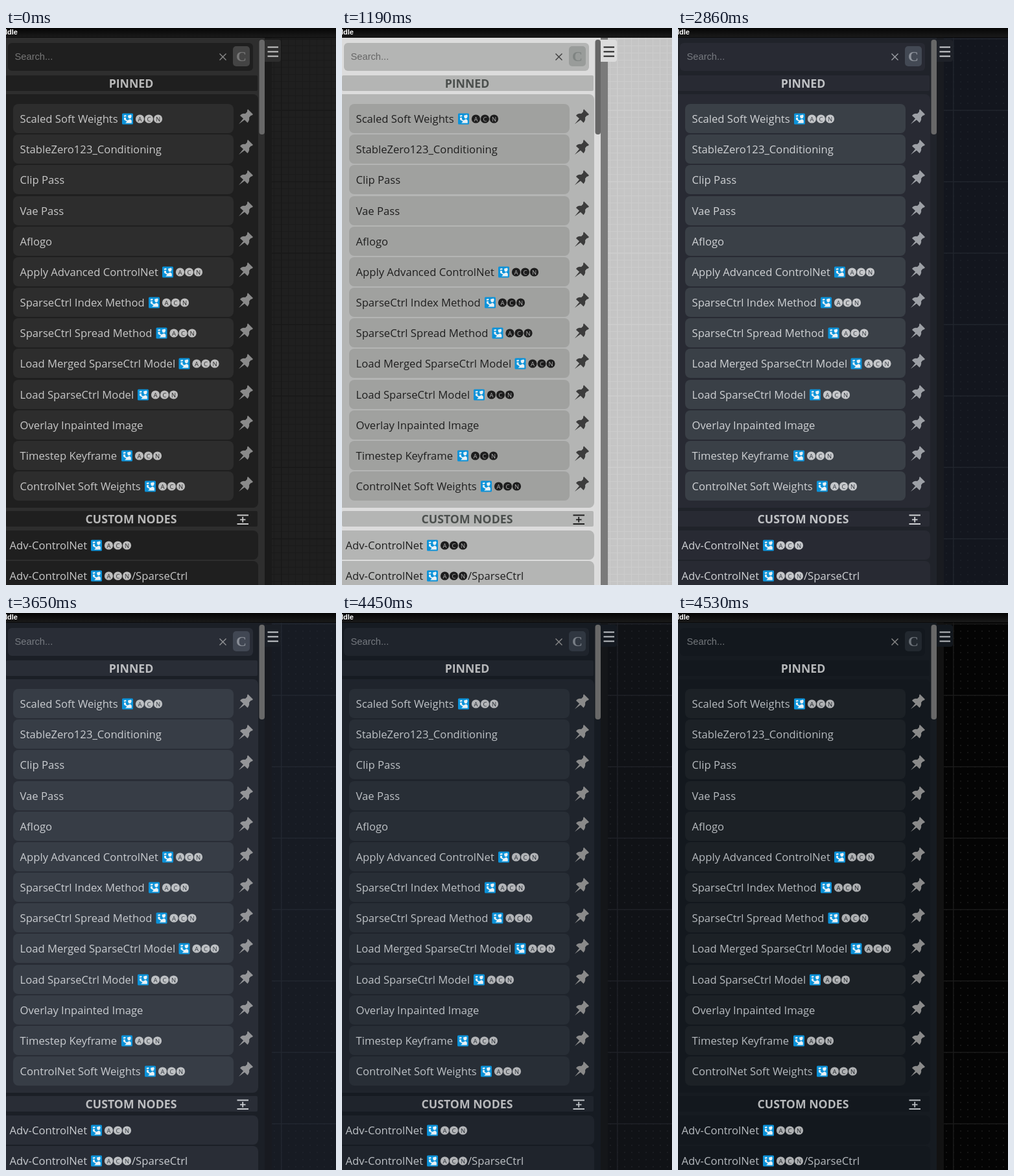
Animation of 509 by 858 pixels, one loop 5.46 s. Source, as an HTML page:

```html
<!DOCTYPE html>
<html lang="en">
<head>
<meta charset="utf-8">
<title>Sidebar themes</title>
<style>
html, body { margin: 0; width: 100%; height: 100%; overflow: hidden; background: #000; }
svg { display: block; width: 509px; height: 858px; }
text { font-family: "Open Sans", "Noto Sans", sans-serif; font-size: 16.65px; fill: var(--text); }
.head { font-size: 17.7px; font-weight: 700; text-anchor: middle; fill: var(--head); }
.status { font: bold 11px "Liberation Sans", Arial, sans-serif; fill: #fff; }
.hint { font: 14.7px "Liberation Sans", Arial, sans-serif; fill: var(--hint); }
.clear { font: bold 22px "Liberation Serif", Times, serif; text-anchor: middle; fill: var(--mark); }
.letter { font: 9.5px "Open Sans", sans-serif; text-anchor: middle; fill: var(--ink); }
.panel { fill: var(--panel); }
.box { fill: var(--box); }
.item { fill: var(--item); }
.pin { fill: var(--pin); }
.disc { fill: var(--disc); }
.stroke { fill: none; stroke: var(--text); stroke-width: 1.8; }
</style>
</head>
<body>
<svg id="stage" viewBox="0 0 509 858">
  <defs>
    <linearGradient id="bar" x2="0" y2="1">
      <stop stop-color="#050505"/><stop offset="1" stop-color="#1b1b1b"/>
    </linearGradient>
    <pattern id="lines" x="424" y="126" width="11" height="11" patternUnits="userSpaceOnUse">
      <path d="M.5 0V11M0 .5H11" stroke="var(--grid)" fill="none"/>
    </pattern>
    <pattern id="dots" x="424" y="126" width="11" height="11" patternUnits="userSpaceOnUse">
      <rect width="2" height="2" fill="var(--grid)"/>
    </pattern>
    <pattern id="major" x="424" y="126" width="110" height="110" patternUnits="userSpaceOnUse">
      <path d="M.5 0V110M0 .5H110" stroke="var(--major)" stroke-width="2" fill="none"/>
    </pattern>
    <path id="pin" class="pin" d="M14 0Q12.5 2 13 4L10 7Q5 6 2 10L7 14.5L0 23L9 16.5L13.5 21Q17 17 16 13L18.5 10Q20.5 10 22 8Z"/>
    <g id="control">
      <rect width="17" height="17" rx="1.5" fill="#0b92d9"/>
      <path d="M2.5 3.2L6 2.4L6.8 4.6L3.4 5.4ZM9 3.2L13.8 2L14.8 4L13.6 7.4L10.6 8L9.4 6ZM3 6.4H6V9.2L8.2 10.8L12.6 8.8L14.8 11V15H5.2L7.6 12.6L3 9.8Z" fill="#e8f1f5"/>
    </g>
  </defs>
  <rect width="509" height="858" fill="var(--canvas)"/>
  <rect id="fine" x="399" y="15" width="110" height="843"/>
  <rect x="399" y="15" width="110" height="843" fill="url(#major)"/>
  <rect x="399" y="15" width="11" height="843" fill="var(--shade)"/>
  <rect class="panel" y="15" width="399" height="843"/>
  <rect width="509" height="15" fill="url(#bar)"/>
  <path d="M0 14.5H509" stroke="#0a0a0a"/>
  <text class="status" x="-1" y="10">Idle</text>
  <path d="M399 18H420Q424 18 424 22V48Q424 52 420 52H399Z" fill="var(--menu)"/>
  <path class="stroke" d="M403.5 29.5H420M403.5 36.5H420M403.5 43.5H420"/>
  <rect x="390.5" y="18" width="8.5" height="146" rx="4" fill="var(--thumb)"/>
  <rect class="box" x="3" y="23" width="378" height="43" rx="6"/>
  <text class="hint" x="13.5" y="49">Search...</text>
  <path d="M329.5 39.5L339.5 49.5M339.5 39.5L329.5 49.5" stroke="var(--pin)" stroke-width="1.4"/>
  <rect x="350" y="28" width="26" height="31" rx="5" fill="var(--btn)"/>
  <text class="clear" x="363" y="51">C</text>
  <rect class="box" y="73" width="388" height="24" rx="2"/>
  <text class="head" x="193" y="92">PINNED</text>
  <rect class="box" x="-10" y="102" width="399" height="637" rx="8"/>
  <rect class="box" y="744" width="388" height="24" rx="2"/>
  <text class="head" x="193" y="763">CUSTOM NODES</text>
  <path class="stroke" d="M356.5 750.5H374M356.5 764H374M365.2 753V761.5M361 757.3H369.5"/>
</svg>
<script>
const stage = document.getElementById("stage");
const fine = document.getElementById("fine");

function add(tag, attrs, label = "") {
  const el = document.createElementNS("http://www.w3.org/2000/svg", tag);
  for (const key in attrs) el.setAttribute(key, attrs[key]);
  el.textContent = label;
  stage.append(el);
}

// Control sign followed by three circled letters
function badge(x, y) {
  add("use", { href: "#control", x, y: y - 14.5 });
  [..."ACN"].forEach((letter, i) => {
    const cx = x + 27.5 + 14 * i;
    add("circle", { class: "disc", cx, cy: y - 6, r: 6.6 });
    add("text", { class: "letter", x: cx, y: y - 2.5 }, letter);
  });
}

const pinned = [
  ["Scaled Soft Weights", 179], ["StableZero123_Conditioning"], ["Clip Pass"], ["Vae Pass"], ["Aflogo"],
  ["Apply Advanced ControlNet", 241], ["SparseCtrl Index Method", 220],
  ["SparseCtrl Spread Method", 231.5], ["Load Merged SparseCtrl Model", 266.5],
  ["Load SparseCtrl Model", 203], ["Overlay Inpainted Image"],
  ["Timestep Keyframe", 178], ["ControlNet Soft Weights", 214]
];
pinned.forEach(([label, badgeX], i) => {
  const y = 117 + Math.round(47.17 * i);
  add("rect", { class: "item", x: 11, y, width: 340, height: 45, rx: 8 });
  add("text", { x: 21.5, y: y + 28.5 }, label);
  if (badgeX) badge(badgeX, y + 29);
  add("use", { href: "#pin", x: 359, y: y + 8 });
});

["", "/SparseCtrl"].forEach((tail, i) => {
  const y = 774 + 47 * i;
  add("rect", { class: "box", x: -10, y, width: 399, height: 45, rx: 8 });
  add("text", { x: 5.5, y: y + 28.5 }, "Adv-ControlNet");
  badge(131, y + 29);
  add("text", { x: 194, y: y + 28.5 }, tail);
});

const keys = "panel box item text head hint pin disc ink btn mark thumb menu canvas grid major shade".split(" ");
const themes = [
  "2e2e2e 1f1f1f 2d2d2d c8c8c8 b8b8b8 777777 8a8a8a bdbdbd 2a2a2a 444444 777777 686868 2d2d2d 1f1f1f 1a1a1a 181818 1a1a1a",
  "dcdcdc b4b5b4 a0a19f 1e1e1e 4b4f4d 666666 3c3c3c 1e1e1e b0b0b0 999c9a 7f8482 666666 dcdcdc c5c5c5 cccccc cecece 7a7a7a",
  "05303b 00242d 213f48 8d9b9d 8f9c9e 788689 5f7277 7f898b 213f48 1f4550 34606b 66777b 05303b 1f1f1f 1a1a1a 181818 211e1e",
  "20232a 282a33 3a4047 d0d2d5 c0c2c5 777a80 9da0a6 c5c7ca 333940 434954 8c919a 686868 1e2128 13161e 1a1e26 20242c 191b20",
  "161b22 2a2f39 343a45 c4c8cc b9babc 777b82 8a8a8a b5b8bc 30363f 3e4552 858a94 686868 161b22 1b1f28 20242e 222732 161920",
  "161b21 13181e 1c2126 b7bbbf b6b8ba 73777b 8a8a8a aeb0b2 1c2126 22282f 6b7178 686868 12171d 040404 161616 191919 121212"
].map(row => row.split(" "));

function mix(a, b, t) {
  const channel = (hex, i) => parseInt(hex.substr(2 * i, 2), 16);
  return "rgb(" + [0, 1, 2].map(i => Math.round(channel(a, i) * (1 - t) + channel(b, i) * t)) + ")";
}

// Start time and theme; half values are blended switches
const steps = [[0, 0], [1190, 1], [1990, 2], [2860, 3], [3650, 3.5], [3720, 4], [4450, 4.5], [4530, 5]];
let shown = -1;

function show(level) {
  const from = themes[Math.floor(level)], to = themes[Math.ceil(level)];
  keys.forEach((key, i) => stage.style.setProperty("--" + key, mix(from[i], to[i], level % 1)));
  fine.setAttribute("fill", level < 3 ? "url(#lines)" : "url(#dots)");
  shown = level;
}

const start = performance.now();
function tick() {
  const time = (performance.now() - start) % 5460;
  const level = steps.filter(step => step[0] <= time).pop()[1];
  if (level !== shown) show(level);
  requestAnimationFrame(tick);
}
tick();
</script>
</body>
</html>
```
